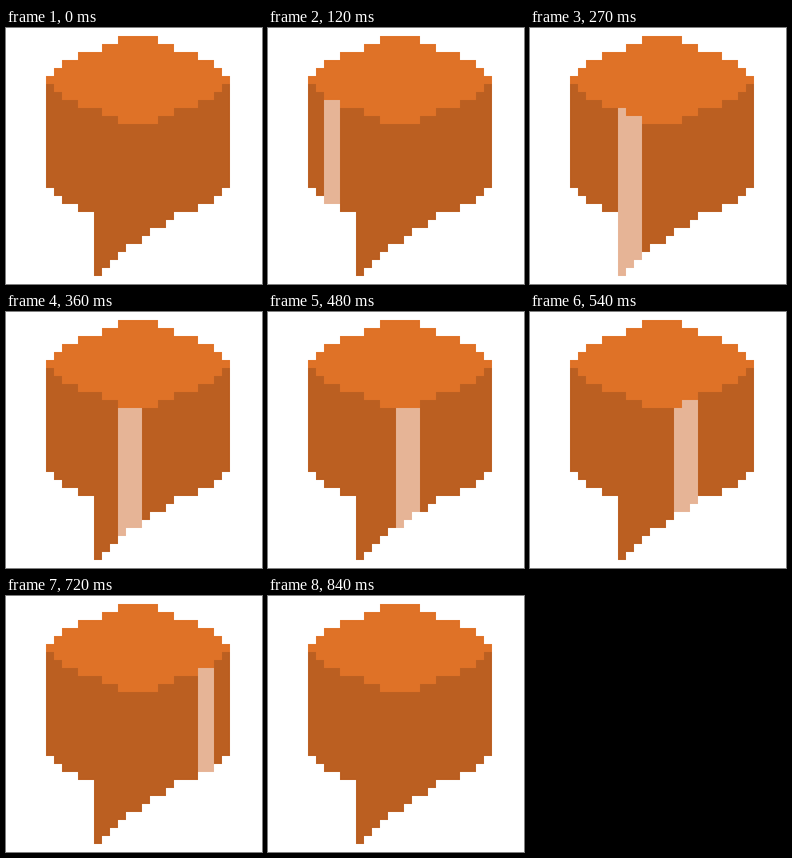
Animation of 320 by 320 pixels, one loop 1.77 s. Source, as an HTML page:

```html
<!DOCTYPE html>
<html lang="en">
<head>
<meta charset="utf-8">
<title>Glinting speech bubble</title>
<style>
  html, body { margin: 0; width: 100%; height: 100%; overflow: hidden; background: #fff; }
  svg { display: block; width: 100%; height: 100%; }
</style>
</head>
<body>
<svg viewBox="0 0 32 32" shape-rendering="crispEdges">
  <path id="side" fill="#bb5f21"/>
  <path id="lid" fill="#df7227"/>
  <path id="glint" fill="#e6b496"/>
</svg>
<script>
  const LOOP = 1770, STEP = 30, LAST = 28;
  const FIRST_COL = 5, LAST_COL = 27;

  // Height of the rim above or below the lid's centre line, per column
  const rimHalf = [0, 1, 2, 2, 3, 3, 3, 4, 4, 5, 5, 5];
  const bottoms = [20, 21, 22, 22, 23, 23, 31, 30, 29, 28, 27, 27,
                   26, 25, 25, 24, 23, 23, 23, 22, 22, 21, 20];

  const rim = c => rimHalf[Math.min(c - FIRST_COL, LAST_COL - c)];
  const lidTop = c => 6 - rim(c);
  const sideTop = c => 7 + rim(c);
  const sideBottom = c => bottoms[c - FIRST_COL];

  // Stepped outline through the columns from a to b
  function columns(a, b, top, bottom) {
    if (a > b) return "";
    let d = `M${a} ${top(a)}`;
    for (let c = a; c <= b; c++) d += `V${top(c)}H${c + 1}`;
    for (let c = b; c >= a; c--) d += `V${bottom(c)}H${c}`;
    return d + "Z";
  }

  // The leading edge slows at the middle and the far side; the trailing edge mirrors it
  const lead = s => Math.min(LAST_COL, s + 4 - (s >= 14) - (s >= 16) - (s >= 24));
  const trail = s => FIRST_COL + LAST_COL - lead(LAST - s);

  const draw = (id, d) => document.getElementById(id).setAttribute("d", d);

  function render(ms) {
    const s = Math.floor((ms % LOOP) / STEP);
    const lit = s > 0 && s < LAST;
    draw("glint", lit ? columns(trail(s), lead(s), sideTop, sideBottom) : "");
  }

  draw("side", columns(FIRST_COL, LAST_COL, sideTop, sideBottom));
  draw("lid", columns(FIRST_COL, LAST_COL, lidTop, sideTop));

  const start = performance.now();
  function tick() {
    render(performance.now() - start);
    requestAnimationFrame(tick);
  }
  tick();
</script>
</body>
</html>
```
